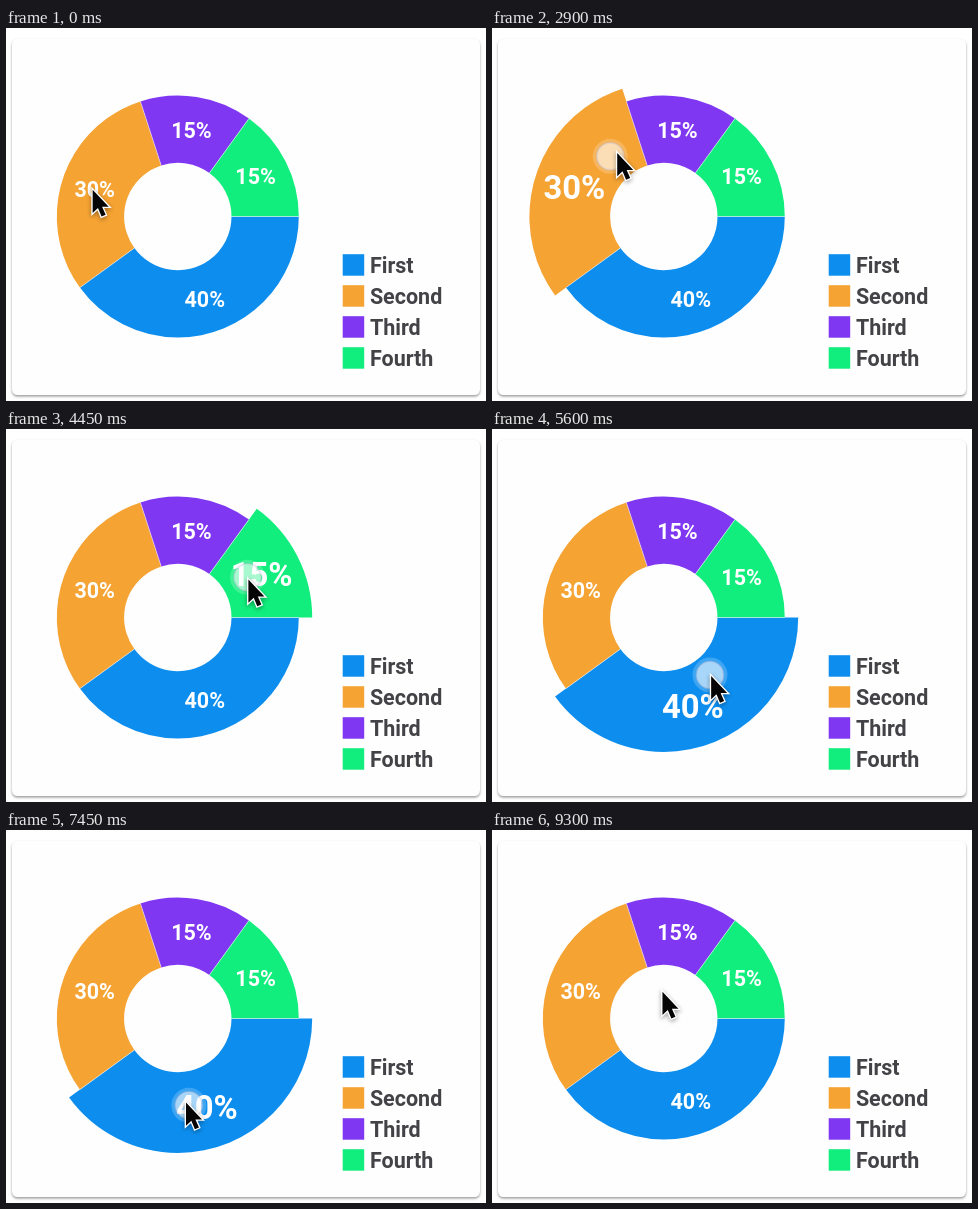
An HTML page with a canvas for the animation above (9350 ms loop, 480 by 373 pixels).

```html
<!DOCTYPE html>
<html lang="en">
<head>
<meta charset="utf-8">
<title>Pie chart</title>
<style>
  html, body { margin: 0; width: 100%; height: 100%; overflow: hidden; background: #fff; }
  canvas { display: block; width: 480px; height: 373px; }
</style>
</head>
<body>
<canvas id="stage"></canvas>
<script>
const W = 480, H = 373, LOOP = 9350, STEP = 50;
const CX = 171.8, CY = 188.5, HOLE = 53.7, TAU = 2 * Math.PI;
const PRESS = 900, RELEASE = 9000, LEG = 950, LEAD = 150;
const FONT = 'Roboto, Arial, sans-serif';

const parts = [
  { name: 'First', share: 40, color: '#0d8eef' },
  { name: 'Second', share: 30, color: '#f5a333' },
  { name: 'Third', share: 15, color: '#7f37f2' },
  { name: 'Fourth', share: 15, color: '#12ee7d' }
];

// Pointer stops, one every LEG ms.
const stops = [
  [86, 161], [83, 155], [83, 155], [104, 130], [222, 106], [241, 160],
  [218, 243], [238, 262], [179, 271], [92, 205], [172, 159]
];

const canvas = document.getElementById('stage');
const ctx = canvas.getContext('2d');
const dpr = window.devicePixelRatio || 1;
canvas.width = W * dpr;
canvas.height = H * dpr;
ctx.scale(dpr, dpr);

const clamp = v => Math.max(0, Math.min(1, v));
const mix = (a, b, k) => a + (b - a) * k;
const stop = i => stops[Math.max(0, Math.min(stops.length - 1, i))];

// Smooth curve through the stops.
function pointer(t) {
  const pos = Math.max(0, (t + LEAD) / LEG);
  const i = Math.floor(pos), u = pos - i, v = 1 - u;
  return [0, 1].map(k => {
    const [p, a, b, n] = [-1, 0, 1, 2].map(d => stop(i + d)[k]);
    return a * (1 + 2 * u) * v * v + b * u * u * (3 - 2 * u) +
      u * v * ((b - p) * v - (n - a) * u) / 2;
  });
}

// Index of the pressed part, or -1.
function touched(t) {
  if (t < PRESS || t >= RELEASE) return -1;
  const [x, y] = pointer(t);
  const dx = x - CX, dy = y - CY;
  if (Math.hypot(dx, dy) < HOLE) return -1;
  let rest = (Math.atan2(dy, dx) / TAU + 1) % 1 * 100;
  return parts.findIndex(part => (rest -= part.share) < 0);
}

// A part takes three steps to grow or shrink.
const growth = (i, t) =>
  [0, 1, 2].filter(n => touched(t - n * STEP) === i).length / 3;

function drawCard() {
  ctx.fillStyle = '#fff';
  ctx.fillRect(0, 0, W, H);
  ctx.save();
  ctx.shadowColor = 'rgba(0,0,0,.4)';
  ctx.shadowBlur = 2.5 * dpr;
  ctx.shadowOffsetY = 1.6 * dpr;
  ctx.fillStyle = '#fefefe';
  ctx.beginPath();
  ctx.roundRect(6, 11, 468, 356, 5.4);
  ctx.fill();
  ctx.restore();
}

function drawChart(t) {
  let start = 0;
  const slices = parts.map((part, i) => {
    const g = growth(i, t);
    const ring = mix(67.3, 80.7, g);
    const end = start + part.share / 100 * TAU;
    const mid = (start + end) / 2, r = HOLE + ring / 2;
    ctx.fillStyle = part.color;
    ctx.beginPath();
    ctx.arc(CX, CY, HOLE + ring, start, end);
    ctx.arc(CX, CY, HOLE, end, start, true);
    ctx.closePath();
    ctx.fill();
    start = end;
    return {
      text: part.share + '%', size: mix(21.5, 32.8, g), end,
      x: CX + r * Math.cos(mid), y: CY + r * Math.sin(mid)
    };
  });
  ctx.fillStyle = '#fff';
  ctx.strokeStyle = 'rgba(255,255,255,.5)';
  ctx.lineWidth = 1;
  ctx.textAlign = 'center';
  for (const s of slices) {
    const c = Math.cos(s.end), q = Math.sin(s.end);
    ctx.beginPath();
    ctx.moveTo(CX + HOLE * c, CY + HOLE * q);
    ctx.lineTo(CX + 121 * c, CY + 121 * q);
    ctx.stroke();
    ctx.font = `bold ${s.size}px ${FONT}`;
    ctx.fillText(s.text, s.x, s.y + s.size * 0.345);
  }
}

function drawLegend() {
  ctx.textAlign = 'left';
  ctx.font = `bold 21.5px ${FONT}`;
  parts.forEach((part, i) => {
    const y = 226.2 + i * 31;
    ctx.fillStyle = part.color;
    ctx.fillRect(336.7, y, 21.5, 21.5);
    ctx.fillStyle = '#434347';
    ctx.fillText(part.name, 363.9, y + 18.5);
  });
}

function disc(x, y, r, color) {
  ctx.fillStyle = color;
  ctx.beginPath();
  ctx.arc(x, y, r, 0, TAU);
  ctx.fill();
}

// The touch mark trails the pointer slightly.
function drawTouch(t) {
  const k = clamp((t - PRESS + STEP) / 150) * (1 - clamp((t - RELEASE) / 150));
  if (!k) return;
  const [x, y] = pointer(t - STEP);
  ctx.save();
  ctx.globalAlpha = k;
  disc(x, y + 3, 17.5, 'rgba(255,255,255,.2)');
  disc(x, y + 3, 13.5, 'rgba(255,255,255,.55)');
  ctx.strokeStyle = 'rgba(190,190,215,.35)';
  ctx.lineWidth = 2;
  ctx.stroke();
  ctx.restore();
}

function drawPointer(t) {
  const [x, y] = pointer(t);
  const shape = new Path2D('M0 0V26L6 20.5L10 30L14.6 28L10.6 19H18Z');
  ctx.save();
  ctx.translate(x + 1, y + 1.5);
  ctx.scale(0.89, 0.89);
  ctx.lineWidth = 3;
  ctx.strokeStyle = '#fff';
  ctx.shadowColor = 'rgba(0,0,0,.4)';
  ctx.shadowBlur = 4 * dpr;
  ctx.shadowOffsetY = 1.5 * dpr;
  ctx.stroke(shape);
  ctx.shadowColor = 'transparent';
  ctx.fillStyle = '#050505';
  ctx.fill(shape);
  ctx.restore();
}

function frame(now) {
  const t = Math.floor((now % LOOP) / STEP) * STEP;
  drawCard();
  drawChart(t);
  drawLegend();
  drawTouch(t);
  drawPointer(t);
}

let origin = null;
function tick(now) {
  if (origin === null) origin = now;
  frame(Math.max(0, now - origin));
  requestAnimationFrame(tick);
}
frame(0);
requestAnimationFrame(tick);
</script>
</body>
</html>
```
